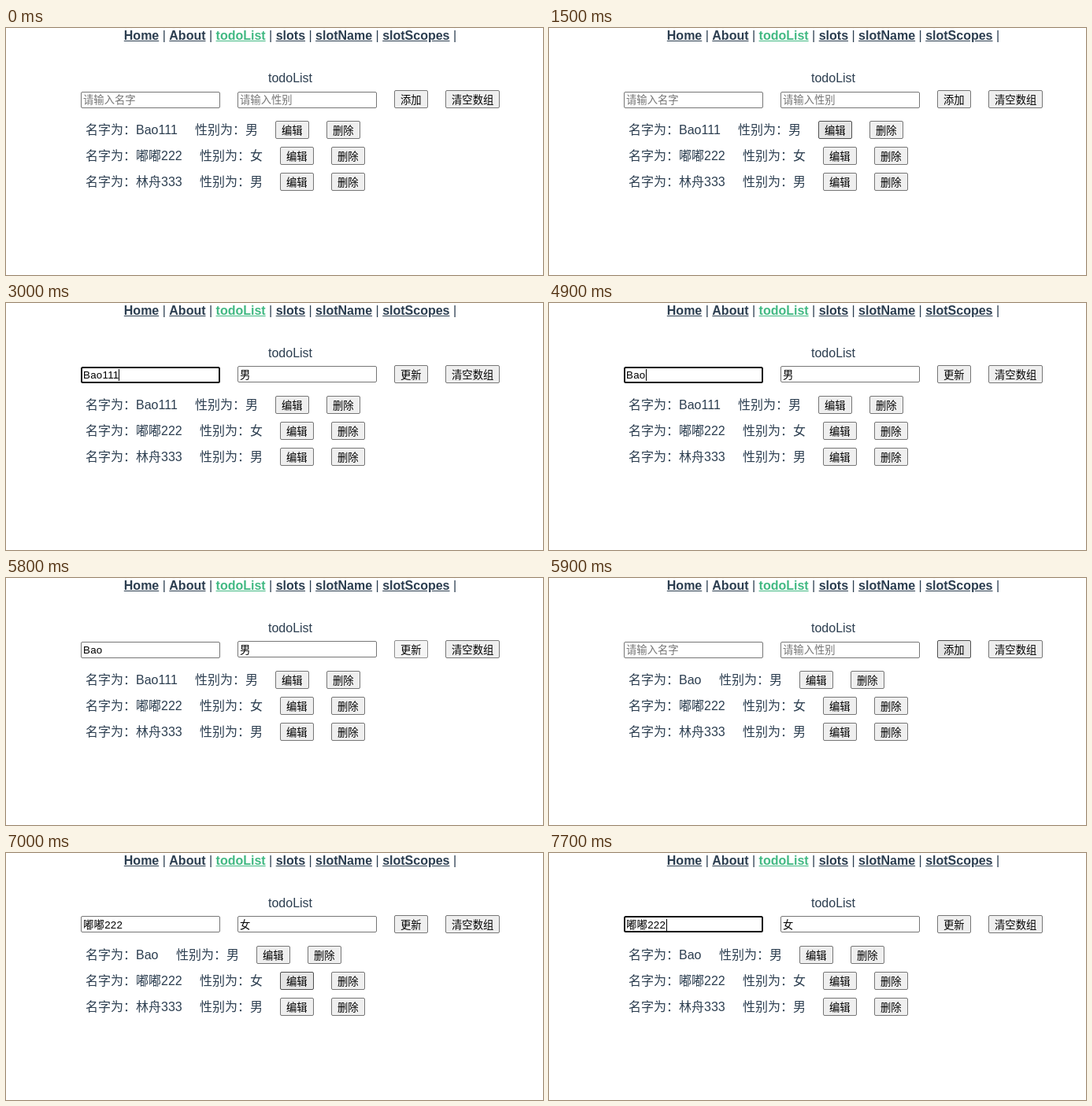
An HTML page that plays this animation: 682 by 314 pixels, repeating every 8000 ms.

```html
<!DOCTYPE html>
<html lang="zh-CN">
<head>
<meta charset="utf-8">
<title>todoList</title>
<style>
  html, body { margin: 0; width: 682px; height: 314px; overflow: hidden; background: #fff; }
  svg { display: block; }
  nav, text { font-family: "Liberation Sans", Arial, "Noto Sans CJK SC", "Noto Sans CJK", sans-serif; }
  nav {
    position: absolute; left: 149.8px; top: 0; white-space: nowrap;
    font-size: 16px; line-height: 0; color: #2c3e50;
  }
  nav::before { content: ""; display: inline-block; height: 15px; }   /* sets the baseline */
  nav span { font-weight: bold; text-decoration: underline; }
  nav .active { color: #42b983; }
  .page { font-size: 16px; font-weight: 300; fill: #2c3e50; }
  .colon { font-family: "Noto Sans CJK TC", "Noto Sans CJK", sans-serif; }
  .control { font-size: 13.333px; fill: #000; }
  .value { letter-spacing: .25px; }
  .hint { fill: #757575; }
</style>
</head>
<body>
<nav><span>Home</span> | <span>About</span> | <span class="active">todoList</span> | <span>slots</span> | <span>slotName</span> | <span>slotScopes</span> |</nav>
<svg id="stage" width="682" height="314" viewBox="0 0 682 314"></svg>
<script>
const LOOP = 8000;
const stage = document.getElementById('stage');

const start = {
  first: 'Bao111', name: '', sex: '', submit: '添加',
  hover: '', press: '', focus: false, caret: 0
};

// Each step changes part of the state from its time on.
const steps = [
  [1500, { hover: 'edit0' }],
  [2100, { name: 'Bao111', sex: '男', submit: '更新' }],
  [2400, { hover: '' }],
  [2600, { hover: 'name' }],
  [3000, { focus: true, caret: 143 }],
  [3500, { caret: 0 }],
  [3700, { name: 'Bao11' }],
  [3900, { name: 'Bao1', caret: 130 }],
  [4100, { name: 'Bao', caret: 123 }],
  [4400, { caret: 0 }],
  [4900, { caret: 123 }],
  [5400, { caret: 0, hover: 'submit' }],
  [5800, { focus: false, press: 'submit' }],
  [5900, { press: '', first: 'Bao', name: '', sex: '', submit: '添加' }],
  [6400, { hover: '' }],
  [6600, { hover: 'edit1' }],
  [6900, { press: 'edit1' }],
  [7000, { press: '', name: '嘟嘟222', sex: '女', submit: '更新' }],
  [7200, { hover: '' }],
  [7500, { hover: 'name' }],
  [7700, { focus: true, caret: 149 }]
];

const text = (x, y, str, cls) => `<text x="${x}" y="${y}" class="${cls}">${str}</text>`;

function box(x, y, w, h, fill, stroke, line = 1) {
  return `<rect x="${x + line / 2}" y="${y + line / 2}" width="${w - line}" height="${h - line}"
    rx="1.5" fill="${fill}" stroke="${stroke}" stroke-width="${line}"/>`;
}

function button(s, id, x, y, label, w = 43) {
  let colors = ['#efefef', '#767676'];
  if (s.hover === id) colors = ['#e5e5e5', '#4f4f4f'];
  if (s.press === id) colors = ['#f5f5f5', '#8d8d8d'];
  return box(x, y, w, 23, ...colors) + text(x + 8, y + 17, label, 'control');
}

function input(s, id, x, hint) {
  const value = s[id];
  const focused = id === 'name' && s.focus;
  const y = /[^\x00-\x7f]/.test(value) ? 80 : 81;   // Chinese text lifts the field
  const edge = focused ? '#101010' : s.hover === id ? '#4f4f4f' : '#767676';
  let out = box(x, y, 177, 21, '#fff', edge, focused ? 2 : 1);
  out += value ? text(x + 3, 96, value, 'control value') : text(x + 3, 96, hint, 'control hint');
  if (focused && s.caret) out += `<rect x="${s.caret}" y="84" width="1" height="15"/>`;
  return out;
}

function field(x, y, label, value) {
  return text(x, y, label + '<tspan class="colon">：</tspan>', 'page') +
    text(x + 64, y, value, 'page');
}

function row(s, i, name, sex, sexX, buttonX) {
  const y = 135 + 33 * i;
  return field(101, y, '名字为', name) + field(sexX, y, '性别为', sex) +
    button(s, 'edit' + i, buttonX, y - 17, '编辑') +
    button(s, 'del' + i, buttonX + 65, y - 17, '删除');
}

function draw(s) {
  const short = s.first === 'Bao';
  stage.innerHTML = text(333, 69, 'todoList', 'page') +
    input(s, 'name', 95, '请输入名字') +
    input(s, 'sex', 294, '请输入性别') +
    button(s, 'submit', 493, 79, s.submit) +
    button(s, 'clear', 558, 79, '清空数组', 69) +
    row(s, 0, s.first, '男', short ? 216 : 240, short ? 318 : 342) +
    row(s, 1, '嘟嘟222', '女', 246, 348) +
    row(s, 2, '林舟333', '男', 246, 348);
}

let shown = -1;
function tick() {
  const t = performance.now() % LOOP;
  const past = steps.filter(([at]) => at <= t);
  if (past.length !== shown) {
    shown = past.length;
    draw(Object.assign({}, start, ...past.map(step => step[1])));
  }
  requestAnimationFrame(tick);
}
tick();
</script>
</body>
</html>
```
